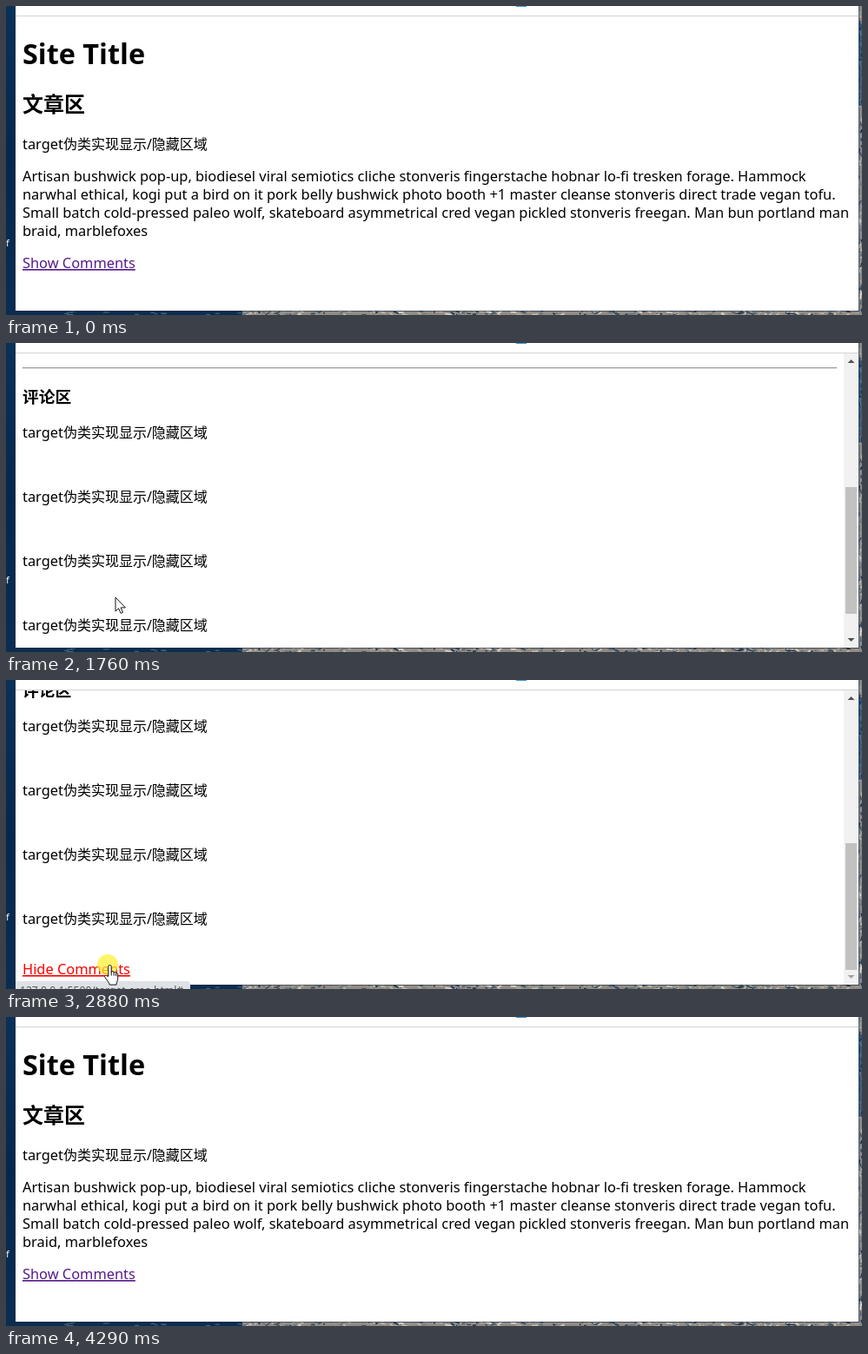
An HTML page for the animation above (4350 ms loop, 985 by 356 pixels).

```html
<!DOCTYPE html>
<html lang="zh-CN">
<head>
<meta charset="utf-8">
<title>Target area</title>
<style>
  html, body { margin: 0; width: 100%; height: 100%; overflow: hidden; background: #0a2a49; }
  svg { display: block; }
  text { font: 16.39px "Noto Sans", "Noto Sans CJK SC", "Noto Sans CJK", sans-serif; white-space: pre; }
  rect { shape-rendering: crispEdges; }
  .zh { font-size: 16px; }
  .h1 { font-size: 32.4px; font-weight: bold; }
  .h2 { font-size: 24px; font-weight: bold; }
  .h3 { font-size: 18.72px; font-weight: bold; }
  .link { fill: #551a8b; text-decoration: underline; text-decoration-thickness: 1px; text-underline-offset: 1px; }
  .link.active { fill: #f00; }
  .small { font-size: 12.13px; fill: #55585d; }
  .cursor { fill: #fff; stroke: #111; stroke-linejoin: round; stroke-linecap: round; }
</style>
</head>
<body>
<svg width="985" height="356" viewBox="0 0 985 356">
  <defs>
    <linearGradient id="sea" x2="0" y2="1">
      <stop offset="0" stop-color="#0a3158"/><stop offset=".5" stop-color="#06274b"/><stop offset="1" stop-color="#0a2d50"/>
    </linearGradient>
    <clipPath id="view"><rect x="11" y="12" width="970" height="339"/></clipPath>
  </defs>

  <rect width="985" height="356" fill="url(#sea)"/>
  <rect x="272" y="351" width="713" height="5" fill="#918b83"/>
  <rect x="981" width="4" height="356" fill="#85888b"/>
  <g id="rocks"></g>
  <text x="0" y="277" style="font-size:11px" fill="#fff">f</text>
  <rect x="10" width="972" height="352" fill="#1b2f45" opacity=".6"/>
  <rect x="11" width="970" height="351" fill="#fff"/>
  <rect x="11" y="11" width="970" height="1" fill="#d2d4d7"/>
  <rect x="586" y="-6" width="14" height="7" rx="2" fill="#3e9ad6"/>

  <g clip-path="url(#view)">
    <g id="article">
      <text class="h1" x="19" y="67">Site Title</text>
      <text class="h2" x="19" y="122">文章区</text>
      <text x="19" y="165">target<tspan class="zh">伪类实现显示/隐藏区域</tspan></text>
      <text x="19" y="202">Artisan bushwick pop-up, biodiesel viral semiotics cliche stonveris fingerstache hobnar lo-fi tresken forage. Hammock</text>
      <text x="19" y="223">narwhal ethical, kogi put a bird on it pork belly bushwick photo booth +1 master cleanse stonveris direct trade vegan tofu.</text>
      <text x="19" y="244">Small batch cold-pressed paleo wolf, skateboard asymmetrical cred vegan pickled stonveris freegan. Man bun portland man</text>
      <text x="19" y="265">braid, marblefoxes</text>
      <text id="show" class="link" x="19" y="302">Show Comments</text>
    </g>
    <g id="comments">
      <g id="content">
        <rect x="19" y="53" width="937" height="1" fill="#9a9a9a"/>
        <rect x="19" y="54" width="937" height="1" fill="#e4e4e4"/>
        <text class="h3" x="19" y="94">评论区</text>
        <g id="list"></g>
        <text id="hide" class="link" x="19" y="414">Hide Comments</text>
      </g>
      <rect x="964" y="12" width="17" height="339" fill="#f1f1f1"/>
      <rect id="thumb" x="966" width="13" height="146" fill="#c1c1c1"/>
      <path d="M968.5 23l4-4 4 4z" fill="#505050"/>
      <path id="down" d="M968.5 340l4 4 4-4z"/>
    </g>
  </g>

  <g id="status">
    <path id="bubble" fill="#dee1e6"/>
    <text id="url" class="small" x="16" y="15"></text>
  </g>
  <g id="pointer">
    <circle id="click" r="12" fill="#fff02a" fill-opacity=".7"/>
    <path id="arrow" class="cursor" d="M0 .5v15.6l3.6-3.4 2.5 5.7 2.4-1-2.4-5.5h4.9z"/>
    <g id="hand" class="cursor" transform="translate(-5 0)">
      <path d="M5.8 13V2.2a1.7 1.7 0 0 1 3.4 0V8.4c.4-1.4 3-1.2 3 .6.5-1 2.5-.8 2.5.8.5-.8 2-.5 2 1v5.4c0 2.5-1.6 3.4-1.7 6.9H7.2c-.3-2.6-3.2-5-5.3-8.6-.9-1.8 1-2.9 2.3-1.6z"/>
      <path fill="none" d="M9.2 8.4v3.8M12.2 9v3.4M14.7 9.8v2.8"/>
    </g>
  </g>
</svg>
<script>
const LOOP = 4350;
const $ = id => document.getElementById(id);
const show = (id, on) => $(id).style.display = on ? '' : 'none';
const mix = (a, b, p) => a + (b - a) * p;

// Progress in n equal jumps, the first at time a and the last at time b.
const steps = (t, a, b, n) =>
  t < a ? 0 : Math.min(1, (Math.floor((t - a) / (b - a) * (n - 1) + 1e-6) + 1) / n);

let seed = 7;
const rnd = (a, b) => {
  seed = (seed * 16807) % 2147483647;
  return mix(a, b, seed / 2147483647);
};

function drawRocks() {
  const tones = ['#1d3145', '#34495c', '#c4beb3', '#aea293', '#d8d3ca', '#66727d'];
  const streak = (x, y, dx, dy) =>
    `<path d="M${x} ${y}l${dx} ${dy}" stroke="${tones[Math.floor(rnd(0, 6))]}" stroke-width="${rnd(.8, 2)}"/>`;
  let out = '';
  for (let i = 0; i < 260; i++) out += streak(rnd(278, 985), rnd(351, 356), rnd(-7, 7), rnd(-3, 3));
  for (let i = 0; i < 110; i++) out += streak(rnd(981, 985), rnd(0, 356), rnd(-2, 2), rnd(-7, 7));
  for (let i = 0; i < 14; i++)
    out += `<path d="M${rnd(60, 272)} ${rnd(352, 356)}h${rnd(3, 9)}" stroke="#4c6b86"/>`;
  out += '<rect x="981" y="20" width="4" height="95" fill="#0d3a66" opacity=".6"/>';
  $('rocks').innerHTML = out;
}

function cursorAt(t) {
  if (t < 600) {
    const p = (steps(t, 70, 520, 7) * 7 - 1) / 6;
    return [mix(680, 153, 1 - (1 - p) ** 1.6), 321 - 181.7 * p + 155.7 * p * p];
  }
  if (t < 2160) {
    const p = steps(t, 600, 830, 4);
    return [mix(153, 126, p), mix(295, 293, p)];
  }
  if (t < 2720) {
    const p = steps(t, 2160, 2650, 7);
    return [mix(126, 112, p), mix(293, 328, p)];
  }
  const p = steps(t, 3270, 3510, 4) / .75;
  return [mix(117, 527, p * p), 328 - 16 * p + 34 * p * p];
}

function drawStatus(t) {
  const first = t < 2000;
  const opacity = first
    ? steps(t, 1000, 1140, 3) - steps(t, 1460, 1610, 3)
    : (t >= 2880) - steps(t, 3270, 3510, 4);
  const right = first ? 272 : 212;
  $('url').textContent = '127.0.0.1:5500/target-area.html#' + (first ? 'comments' : '');
  $('bubble').setAttribute('d', `M11 0H${right - 4}q4 0 4 4V21H11z`);
  $('status').setAttribute('transform', `translate(0 ${first ? 330 : 347})`);
  $('status').style.opacity = opacity;
}

function draw(t) {
  const open = t >= 1070 && t < 2960;
  const pressShow = t >= 1000 && t < 1070;
  const pressHide = t >= 2800 && t < 2960;
  show('article', !open);
  show('comments', open);
  $('show').classList.toggle('active', pressShow);
  $('hide').classList.toggle('active', pressHide);

  const scroll = steps(t, 1760, 1930, 3);
  $('content').setAttribute('transform', `translate(0 ${-75 * scroll})`);
  $('thumb').setAttribute('y', mix(155, 188, scroll));
  $('down').setAttribute('fill', scroll < 1 ? '#505050' : '#a3a3a3');

  drawStatus(t);

  const [x, y] = cursorAt(t);
  const overLink = (t >= 600 && t < 1140) || (t > 2160 && t < 2960 && y > 323);
  show('pointer', t >= 70 && t < 3510);
  show('click', pressShow || pressHide);
  show('hand', overLink);
  show('arrow', !overLink);
  $('pointer').setAttribute('transform', `translate(${Math.round(x)} ${Math.round(y)})`);
}

drawRocks();
$('list').innerHTML = [134, 208, 282, 356].map(y =>
  `<text x="19" y="${y}">target<tspan class="zh">伪类实现显示/隐藏区域</tspan></text>`).join('');

const start = performance.now();
(function tick() {
  draw((performance.now() - start) % LOOP);
  requestAnimationFrame(tick);
})();
</script>
</body>
</html>
```
